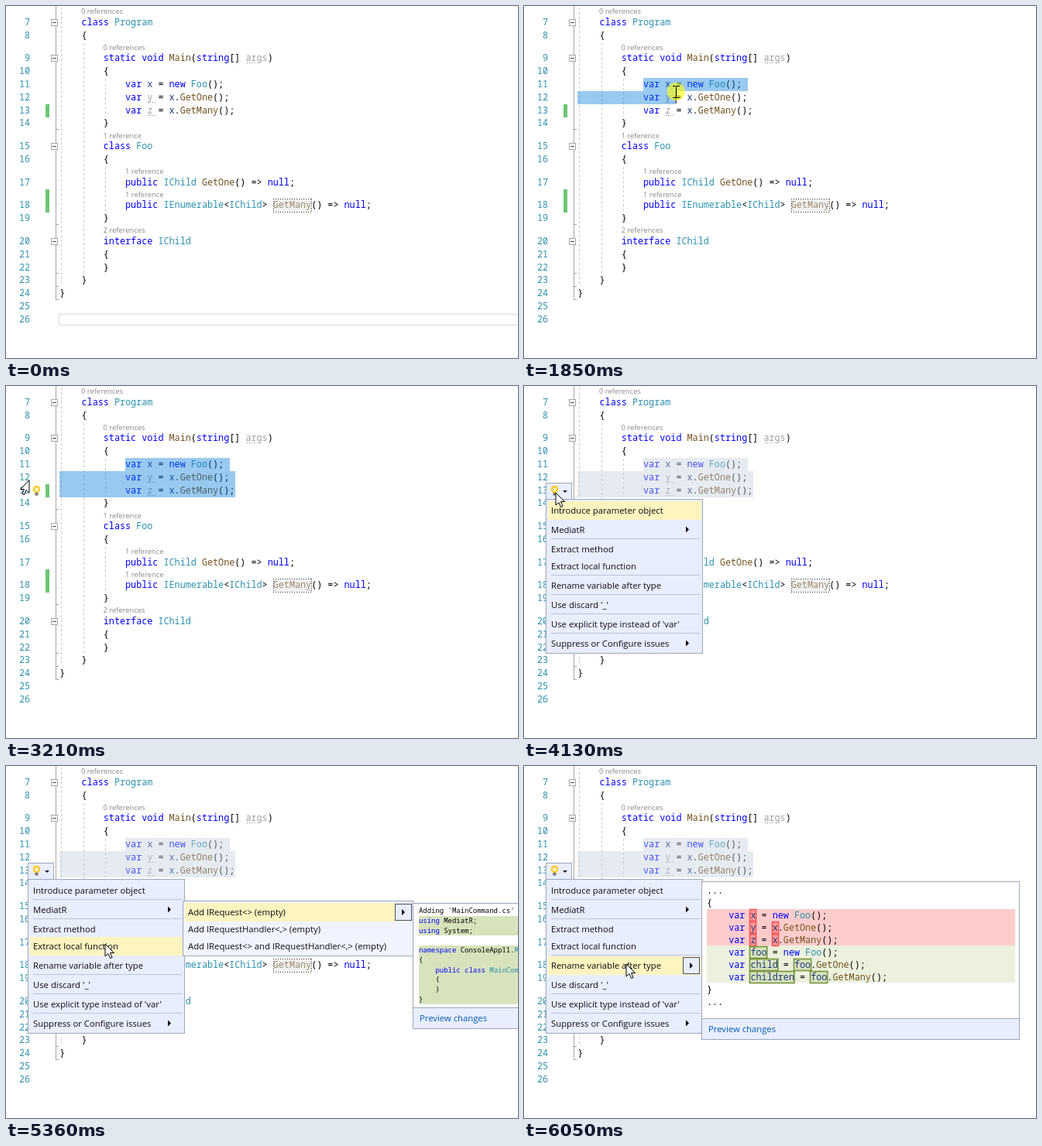
These frames come from a looping animation (661x455 px, 8 s). An HTML page with a canvas:

```html
<!DOCTYPE html>
<html lang="en">
<head>
<meta charset="utf-8">
<title>Rename refactoring</title>
<style>
html, body { margin: 0; width: 100%; height: 100%; overflow: hidden; background: #fff; }
canvas { display: block; }
</style>
</head>
<body>
<canvas id="stage" width="661" height="455"></canvas>
<script>
const ctx = document.getElementById('stage').getContext('2d');
const LOOP = 8000;
const MONO = '"Noto Sans Mono", "DejaVu Sans Mono", monospace';
const SANS = '"Open Sans", "Noto Sans", sans-serif';
const CODE_SIZE = 11.77, ADVANCE = 0.6;
const PANEL = '#e9eeff', BORDER = '#9ba7b7', HOVER = '#fdf4bf';

// [line number, text centre y, code]
const LINES = [
  [7, 21, '    class Program'], [8, 38, '    {'],
  [9, 67, '        static void Main(string[] args)'], [10, 84, '        {'],
  [11, 101, '            var x = new Foo();'], [12, 118, '            var y = x.GetOne();'],
  [13, 135, '            var z = x.GetMany();'], [14, 151, '        }'],
  [15, 181, '        class Foo'], [16, 198, '        {'],
  [17, 228, '            public IChild GetOne() => null;'],
  [18, 257, '            public IEnumerable<IChild> GetMany() => null;'],
  [19, 274, '        }'], [20, 304, '        interface IChild'], [21, 321, '        {'],
  [22, 338, '        }'], [23, 354, '    }'], [24, 371, '}'], [25, 388, ''], [26, 405, '']
];
const REFERENCES = [
  ['0 references', 97, 7], ['0 references', 125.5, 54], ['1 reference', 125.5, 168],
  ['1 reference', 154, 214], ['1 reference', 154, 244], ['2 references', 125.5, 290]
];
const MENU = [
  ['Introduce parameter object', 161], ['MediatR', 186], ['Extract method', 211],
  ['Extract local function', 233], ['Rename variable after type', 258], ["Use discard '_'", 283],
  ["Use explicit type instead of 'var'", 308], ['Suppress or Configure issues', 333]
];
const RENAME = 4;

// Pointer moves: [first step, last step, step count, x, y, easing]
const easeOut = p => 1 - (1 - p) ** 2;
const smooth = p => p * p * (3 - 2 * p);
const linear = p => p;
const MOVES = [
  [610, 1370, 11, 158, 105, easeOut], [1450, 1530, 2, 155, 102, linear],
  [1680, 2300, 9, 312, 135, smooth], [2530, 3290, 11, 28, 122, easeOut],
  [3360, 3600, 4, 41, 138, easeOut], [4590, 4670, 2, 46, 137, linear],
  [4900, 5360, 7, 128, 230, linear], [5440, 5670, 4, 132, 256, linear]
];

function pointerAt(t) {
  let x = 519, y = 522;
  for (const [start, end, steps, toX, toY, ease] of MOVES) {
    if (t < start) break;
    const step = Math.floor((t - start) / (end - start) * (steps - 1) + 1.1);
    const p = ease(Math.min(1, step / steps));
    x += (toX - x) * p;
    y += (toY - y) * p;
  }
  return { x, y };
}

function rect(x, y, w, h, fill, stroke, width = 1) {
  if (fill) { ctx.fillStyle = fill; ctx.fillRect(x, y, w, h); }
  if (stroke) {
    ctx.strokeStyle = stroke;
    ctx.lineWidth = width;
    ctx.strokeRect(x + 0.5, y + 0.5, w - 1, h - 1);
  }
}

function line(x1, y1, x2, y2, color, dash = []) {
  ctx.strokeStyle = color;
  ctx.lineWidth = 1;
  ctx.setLineDash(dash);
  ctx.beginPath();
  ctx.moveTo(x1, y1);
  ctx.lineTo(x2, y2);
  ctx.stroke();
  ctx.setLineDash([]);
}

function polygon(points, fill, stroke) {
  ctx.beginPath();
  points.forEach(([x, y]) => ctx.lineTo(x, y));
  ctx.closePath();
  ctx.fillStyle = fill;
  ctx.fill();
  if (stroke) { ctx.strokeStyle = stroke; ctx.lineWidth = 1; ctx.stroke(); }
}

function disc(x, y, r, fill) {
  ctx.fillStyle = fill;
  ctx.beginPath();
  ctx.arc(x, y, r, 0, 7);
  ctx.fill();
}

function label(text, x, y, size = 11.3, color = '#0c0c14') {
  ctx.font = `${size}px ${SANS}`;
  ctx.fillStyle = color;
  ctx.fillText(text, x, y + size * 0.36);
}

const KEYWORD = /^(class|static|void|string|var|new|public|null|interface|using|namespace)$/;
const TYPE = /^(Program|Foo|IChild|IEnumerable|MainCommand)$/;
const METHOD = /^(Main|GetOne|GetMany)$/;
const VARIABLE = /^([xyz]|foo|child|children)$/;
const UNUSED = /^([yz]|args)$/;

function code(text, x, y, { size = CODE_SIZE, fade = false, classified = true } = {}) {
  ctx.font = `${size}px ${MONO}`;
  for (const { 0: word, index } of text.matchAll(/\w+|[^\w\s]+/g)) {
    ctx.fillStyle = KEYWORD.test(word) ? '#0000ff'
      : fade && UNUSED.test(word) ? '#a0a0a0'
      : !classified ? '#000'
      : TYPE.test(word) ? '#2b91af'
      : METHOD.test(word) ? '#74531f'
      : VARIABLE.test(word) ? '#1f377f' : '#000';
    ctx.fillText(word, x + index * size * ADVANCE, y + size * 0.34);
  }
}

// The selection is a translucent layer above the text.
function drawSelection(t, pointer) {
  if (t < 1680) return rect(68, 398, 700, 15, null, '#e6e8f1', 2);
  const color = t < 3905 ? 'rgba(0,120,215,.4)' : 'rgba(191,205,219,.4)';
  const lastRow = t < 2530 ? Math.max(0, Math.min(2, Math.floor((pointer.y - 93) / 17))) : 2;
  const ends = [289, 296, 296];
  let caretX;
  for (let row = 0; row <= lastRow; row++) {
    const left = row ? 69 : 154;
    const limit = row === 0 && lastRow === 0 ? 281 : ends[row];
    caretX = row < lastRow || t >= 2530 ? limit : Math.min(limit, pointer.x);
    rect(left, 93 + row * 17, Math.max(0, caretX - left), 17, color);
  }
  if (t < 2850 || (t >= 3360 && t < 3905)) rect(caretX, 93 + lastRow * 17, 1, 16, '#000');
}

function drawEditor(t, pointer) {
  rect(51, 127, 5, 17, '#6cc674');
  rect(51, 237, 5, 30, '#6cc674');
  line(64.5, 0, 64.5, 379, '#a5a5a5');
  for (const y of [159.5, 282.5, 345.5, 362.5, 379.5]) line(64, y, 68, y, '#a5a5a5');
  for (const y of [21, 67, 181, 304]) {
    rect(58, y - 4, 9, 9, '#fff', '#a5a5a5');
    line(60, y + 0.5, 65, y + 0.5, '#444');
  }
  const guides = [[71.5, 2, 362], [100.5, 48, 345], [128.5, 94, 143], [128.5, 208, 266]];
  for (const [x, top, bottom] of guides) line(x, top, x, bottom, '#c8c8c8', [3, 3]);

  for (const [number, y, text] of LINES) {
    ctx.font = `${CODE_SIZE}px ${MONO}`;
    ctx.textAlign = 'right';
    ctx.fillStyle = '#2b91af';
    ctx.fillText(number, 31, y + 4);
    ctx.textAlign = 'left';
    code(text, 69.3, y, { fade: true });
  }
  for (const [x, y] of [[311, 73], [183, 124], [183, 141]])
    for (let i = 0; i < 4; i++) rect(x + i * 3, y, 1, 1, '#777');
  for (const [text, x, y] of REFERENCES) label(text, x, y, 9.4, '#888');

  rect(345, 249, 50, 17, 'rgba(220,220,220,.4)');
  for (const y of [249.5, 266.5]) line(345, y, 396, y, '#333', [1, 2]);
  for (const x of [345.5, 394.5]) line(x, 249, x, 267, '#333', [1, 2]);
  drawSelection(t, pointer);
}

function drawBulb(t) {
  if (t < 2990) return;
  if (t >= 3600) {
    rect(28, 125, 34, 22, PANEL, BORDER);
    polygon([[50, 135], [56, 135], [53, 138]], '#1e1e1e');
  }
  disc(39.5, 133.5, 4.7, '#ffc61a');
  disc(39.5, 133.5, 2.6, '#fff3c4');
  rect(37.5, 138, 4, 3.5, '#777');
}

function submenuArrow(x, y, boxed) {
  if (boxed) rect(x - 5, y - 11, 22, 22, PANEL, '#4a5058');
  polygon([[x + 4, y - 4], [x + 8, y], [x + 4, y + 4]], '#000');
}

function drawMenu(hovered, previewOpen) {
  rect(28, 146, 203, 200, PANEL, BORDER);
  for (const y of [173, 198, 245, 270, 295, 320]) line(35, y - 0.5, 227, y - 0.5, '#bcc3d3');
  rect(31, MENU[hovered][1] - 12, 198, 24, HOVER);
  MENU.forEach(([text, y], i) => {
    label(text, 35, y);
    if (i === 1 || i === 7) submenuArrow(205, y - 0.5, false);
  });
  if (previewOpen) submenuArrow(210, MENU[hovered][1], true);
}

function previewPanel(x, y, w, h) {
  rect(x, y, w, h, '#fff', BORDER);
  rect(x, y + h - 28, w, 28, PANEL, BORDER);
  label('Preview changes', x + 9, y + h - 14, 11.3, '#0058b0');
}

function drawIntroducePreview() {
  previewPanel(229, 149, 460, 137);
  rect(236, 185, 440, 16, '#ffcccc');
  rect(236, 201, 440, 16, '#ebf1dd');
  ['...', '{', '    static void Main(string[] args)', '    static void Main(MainArgs args)', '    {', '...']
    .forEach((text, i) => code(text, 236, 161 + i * 16));
}

function drawMediatorMenu(t) {
  rect(228, 174, 298, 72, '#f1f4ff', BORDER);
  rect(231, 177, 272, 24, HOVER);
  label('Add IRequest<> (empty)', 235, 189);
  label('Add IRequestHandler<,> (empty)', 235, 211);
  label('Add IRequest<> and IRequestHandler<,> (empty)', 235, 233);
  submenuArrow(507, 189, true);
  if (t < 5200) return;
  previewPanel(525, 177, 200, 163);
  code("Adding 'MainCommand.cs'", 533, 187, { size: 8.95, classified: false });
  ['using MediatR;', 'using System;', '', 'namespace ConsoleApp11.MainCommand',
    '{', '    public class MainCommand', '    {', '    }', '}']
    .forEach((text, i) => {
      const y = 200 + i * 12.7;
      if (text) rect(533, Math.round(y - 6.4), 180, 13, '#d7e3bc');
      code(text, 533, y, { size: 8.95 });
    });
}

function drawRenamePreview(t) {
  previewPanel(229, 149, 411, 205);
  rect(236, 185, 398, 47, '#ffcccc');
  rect(236, 232, 398, 48, '#ebf1dd');
  ['...', '{', '    var x = new Foo();', '    var y = x.GetOne();', '    var z = x.GetMany();',
    '    var foo = new Foo();', '    var child = foo.GetOne();', '    var children = foo.GetMany();', '}', '...']
    .forEach((text, i) => {
      const y = 161 + i * 16;
      const removed = i < 5;
      for (const { 0: word, index } of text.matchAll(/\b([xyz]|foo|children|child)\b/g)) {
        const left = Math.round(236 + index * CODE_SIZE * ADVANCE) - 1;
        rect(left, y - 8, word.length * CODE_SIZE * ADVANCE + 2, 16,
          removed ? '#ff9999' : '#d7e3bc', removed ? '#ff5555' : '#76923c', 1.6);
      }
      code(text, 236, y, { classified: t >= 6050 });
    });
}

function drawPointer(t, { x, y }) {
  ctx.save();
  ctx.translate(Math.round(x), Math.round(y));
  if (t < 3360 && x > 66) {
    rect(0, -7, 1, 15, '#000');
    for (const top of [-8, 7]) {
      rect(-4, top, 4, 1, '#000');
      rect(1, top, 4, 1, '#000');
    }
  } else {
    if (t < 3440) ctx.scale(-1, 1);
    polygon([[0, 0], [0, 16], [4, 12.5], [6.5, 18.5], [9, 17.5], [6.5, 11.5], [11.5, 11.5]], '#fff', '#000');
  }
  ctx.restore();
}

function draw(t) {
  const pointer = pointerAt(t);
  rect(0, 0, 661, 455, '#fff');
  drawEditor(t, pointer);
  drawBulb(t);

  if (t >= 4055) {
    let hovered = 0;
    MENU.forEach(([, y], i) => { if (pointer.y >= y - 12) hovered = i; });
    const introduceOpen = t >= 4360 && hovered === 0;
    const renameOpen = t >= 5820 && hovered === RENAME;
    drawMenu(hovered, introduceOpen || renameOpen);
    if (introduceOpen) drawIntroducePreview();
    if (t >= 5130 && t < 5590) drawMediatorMenu(t);
    if (renameOpen) drawRenamePreview(t);
  }
  const pressed = (t >= 1680 && t < 2530) || (t >= 3830 && t < 3980);
  if (pressed) disc(pointer.x + 0.5, pointer.y, 11.5, 'rgba(255,255,0,.6)');
  drawPointer(t, pointer);
}

const startTime = performance.now();
function tick() {
  draw((performance.now() - startTime) % LOOP);
  requestAnimationFrame(tick);
}
tick();
</script>
</body>
</html>
```
